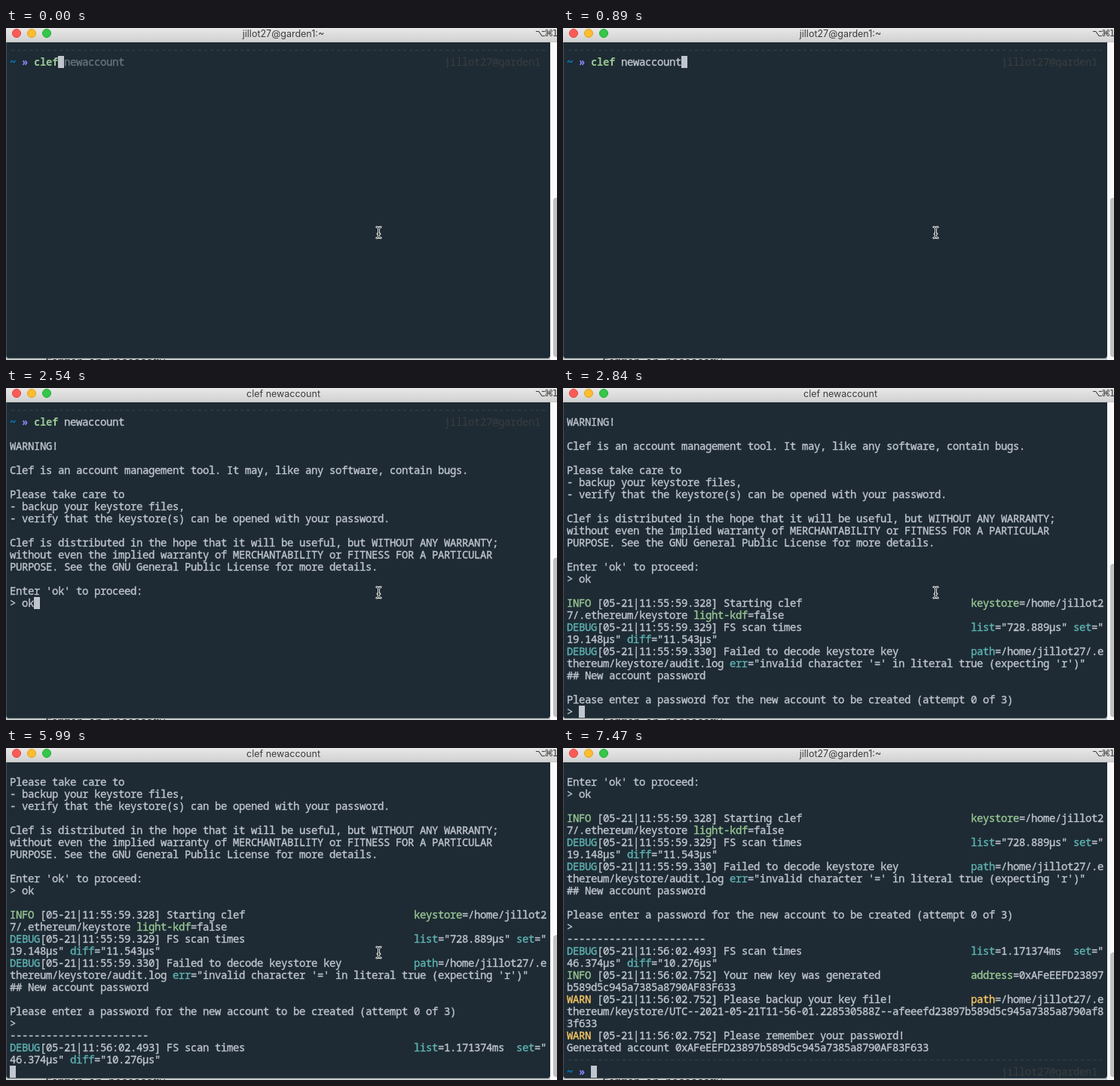
An HTML page for the animation above (7.92 s loop, 731 by 440 pixels).

```html
<!DOCTYPE html>
<html lang="en">
<head>
<meta charset="utf-8">
<title>Terminal</title>
<style>
html, body { margin: 0; width: 100%; height: 100%; overflow: hidden; }
body { position: relative; background: #fafafa; --loop: 7.92s step-end infinite; }

.bar {
  position: absolute; inset: 0 0 auto; height: 19px; box-sizing: border-box;
  background: linear-gradient(#e8e8e8, #d1d1d1);
  border-bottom: 1px solid #c3c6c8;
  font: 12.5px/15px Inter, sans-serif; color: #3e3e3e;
}
.bar b {
  position: absolute; left: 8px; top: 1px; width: 12px; height: 12px;
  box-sizing: border-box; border-radius: 50%;
  background: #fc5b57; border: 1px solid #e2463f;
}
.bar b + b { left: 28px; background: #fdbd2e; border-color: #dfa023; }
.bar b + b + b { left: 48px; background: #34c749; border-color: #27aa35; }
.bar span { position: absolute; left: 268px; width: 200px; text-align: center; white-space: pre; }
.idle { animation: idle-title var(--loop); }
.busy { animation: busy-title var(--loop); }
.bar .keys {
  left: 702px; width: auto; letter-spacing: -1.5px;
  font: 12px/14px "DejaVu Sans", sans-serif;
}

.below {
  position: absolute; left: 0; top: 437px; width: 722px; height: 3px; overflow: hidden;
  background: #c9cccd; font: 14px/14px "Noto Sans Mono", monospace; color: #111; text-indent: 52px;
}
.below i { font-style: normal; position: relative; top: -2px; }
.window {
  position: absolute; left: 0; top: 19px; width: 722px; height: 419px; box-sizing: border-box;
  background: #1e2b34; border-left: 1px solid #46525a; border-bottom: 1px solid #46525a;
  border-radius: 0 0 4px 4px;
}
.thumb {
  position: absolute; left: 726px; top: 225px; width: 8px; bottom: 4px;
  border-radius: 4px; background: #c1c1c1; animation: thumb var(--loop);
}

.screen {
  position: absolute; left: 5px; top: 21px; width: 717px; height: 416px;
  overflow: hidden; clip-path: inset(2px 0 0);
}
.tape { animation: scroll var(--loop); }
pre {
  position: absolute; left: 0; top: 0; margin: 0; width: 717px; overflow: hidden;
  font: 14px/16px "Noto Sans Mono", "DejaVu Sans Mono", monospace;
  letter-spacing: calc(8px - 1ch); font-variant-ligatures: none;
  -webkit-text-stroke: .35px;
  color: #c0c5ce; animation: print var(--loop);
}
.caret {
  position: absolute; left: 0; top: 0; width: 8px; height: 16px;
  background: #c0c5ce; animation: caret var(--loop);
}
pre i { font-style: normal; }
pre b, .mark, .dim { -webkit-text-stroke: 0; }
.m { display: inline-block; width: 328px; }
.g { color: #99c794; }
.c { color: #5fb3b3; }
.y { color: #fac863; }
.dim { color: #3b3d3f; }
.dim.host { position: absolute; left: 576px; }
.home { color: #0087d7; }
.mark { color: #8787ff; font-weight: bold; }
.ghost { animation: ghost var(--loop); }
.under { animation: under var(--loop); }
.o { animation: show-o var(--loop); }
.k { animation: show-k var(--loop); }

.mouse {
  position: absolute; left: 490px; top: 262px; width: 9px; height: 18px;
  fill: none; stroke-linecap: round; animation: mouse var(--loop);
}

@keyframes idle-title {
  0%, 77.398%, 100% { visibility: visible; }
  20.707% { visibility: hidden; }
}
@keyframes busy-title {
  0%, 77.398%, 100% { visibility: hidden; }
  20.707% { visibility: visible; }
}
@keyframes thumb {
  0% { top: 225px; }
  35.858% { top: 233px; }
  58.585% { top: 241px; }
  75.631% { top: 248px; }
  77.398%, 100% { top: 271px; }
}
@keyframes scroll {
  0% { transform: none; }
  35.858% { transform: translateY(-32px); }
  58.585% { transform: translateY(-64px); }
  75.631% { transform: translateY(-96px); }
  79.292%, 100% { transform: translateY(-224px); }
}
@keyframes print {
  0% { height: 32px; }
  20.707% { height: 272px; }
  35.858% { height: 448px; }
  58.585% { height: 464px; }
  75.631% { height: 496px; }
  79.292%, 100% { height: 640px; }
}
@keyframes caret {
  0% { transform: translate(64px, 16px); }
  1.893% { transform: translate(72px, 16px); }
  11.237% { transform: translate(152px, 16px); }
  20.707% { transform: translate(16px, 256px); }
  30.176% { transform: translate(24px, 256px); }
  32.07% { transform: translate(32px, 256px); }
  35.858% { transform: translate(16px, 432px); }
  58.585% { transform: translate(0, 464px); }
  75.631% { transform: translate(0, 496px); }
  79.292%, 100% { transform: translate(32px, 624px); }
}
@keyframes ghost {
  0% { color: #65737e; }
  11.237%, 100% { color: #c0c5ce; }
}
@keyframes under {
  0% { color: #65737e; }
  1.893% { color: #1e2b34; }
  11.237%, 100% { color: #c0c5ce; }
}
@keyframes show-o {
  0% { visibility: hidden; }
  30.176%, 100% { visibility: visible; }
}
@keyframes show-k {
  0% { visibility: hidden; }
  32.07%, 100% { visibility: visible; }
}
@keyframes mouse {
  0% { transform: none; visibility: visible; }
  90.656% { transform: translate(26px, -12px); visibility: visible; }
  92.424% { transform: translate(55px, 37px); visibility: visible; }
  94.318%, 100% { transform: translate(55px, 37px); visibility: hidden; }
}
</style>
</head>
<body>
<div class="bar">
  <b></b><b></b><b></b>
  <span class="idle">jillot27@garden1:~</span>
  <span class="busy">clef newaccount</span>
  <span class="keys">⌥⌘1</span>
</div>
<div class="below"><i>Common in necessary</i></div>
<div class="window"></div>
<div class="thumb"></div>

<div class="screen"><div class="tape">
<div class="caret"></div>
<pre>
<i class="dim">-----------------------------------------------------------------------------------------</i>
<i class="home">~</i> <i class="mark">»</i> <b class="g">clef</b> <i class="under">n</i><i class="ghost">ewaccount</i><i class="dim host">jillot27@garden1</i>

WARNING!

Clef is an account management tool. It may, like any software, contain bugs.

Please take care to
- backup your keystore files,
- verify that the keystore(s) can be opened with your password.

Clef is distributed in the hope that it will be useful, but WITHOUT ANY WARRANTY;
without even the implied warranty of MERCHANTABILITY or FITNESS FOR A PARTICULAR
PURPOSE. See the GNU General Public License for more details.

Enter 'ok' to proceed:
&gt; <i class="o">o</i><i class="k">k</i>

<i class="g">INFO</i> [05-21|11:55:59.328] <i class="m">Starting clef</i><i class="g">keystore</i>=/home/jillot2
7/.ethereum/keystore <i class="g">light-kdf</i>=false
<i class="c">DEBUG</i>[05-21|11:55:59.329] <i class="m">FS scan times</i><i class="c">list</i>="728.889µs" <i class="c">set</i>="
19.148µs" <i class="c">diff</i>="11.543µs"
<i class="c">DEBUG</i>[05-21|11:55:59.330] <i class="m">Failed to decode keystore key</i><i class="c">path</i>=/home/jillot27/.e
thereum/keystore/audit.log <i class="c">err</i>="invalid character '=' in literal true (expecting 'r')"
## New account password

Please enter a password for the new account to be created (attempt 0 of 3)
&gt;
-----------------------
<i class="c">DEBUG</i>[05-21|11:56:02.493] <i class="m">FS scan times</i><i class="c">list</i>=1.171374ms  <i class="c">set</i>="
46.374µs" <i class="c">diff</i>="10.276µs"
<i class="g">INFO</i> [05-21|11:56:02.752] <i class="m">Your new key was generated</i><i class="g">address</i>=0xAFeEEFD23897
b589d5c945a7385a8790AF83F633
<i class="y">WARN</i> [05-21|11:56:02.752] <i class="m">Please backup your key file!</i><i class="y">path</i>=/home/jillot27/.e
thereum/keystore/UTC--2021-05-21T11-56-01.228530588Z--afeeefd23897b589d5c945a7385a8790af8
3f633
<i class="y">WARN</i> [05-21|11:56:02.752] Please remember your password!
Generated account 0xAFeEEFD23897b589d5c945a7385a8790AF83F633
<i class="dim">-----------------------------------------------------------------------------------------</i>
<i class="home">~</i> <i class="mark">»</i><i class="dim host">jillot27@garden1</i>
</pre>
</div></div>

<svg class="mouse" viewBox="0 0 9 18">
  <defs><path id="beam" d="M1.8 1.8Q4.5 1.8 4.5 4.5V13.5Q4.5 16.2 1.8 16.2M7.2 1.8Q4.5 1.8 4.5 4.5M7.2 16.2Q4.5 16.2 4.5 13.5M3 11H6"/></defs>
  <use href="#beam" stroke="#fff" stroke-width="2.8"/>
  <use href="#beam" stroke="#111" stroke-width="1"/>
</svg>
</body>
</html>
```
